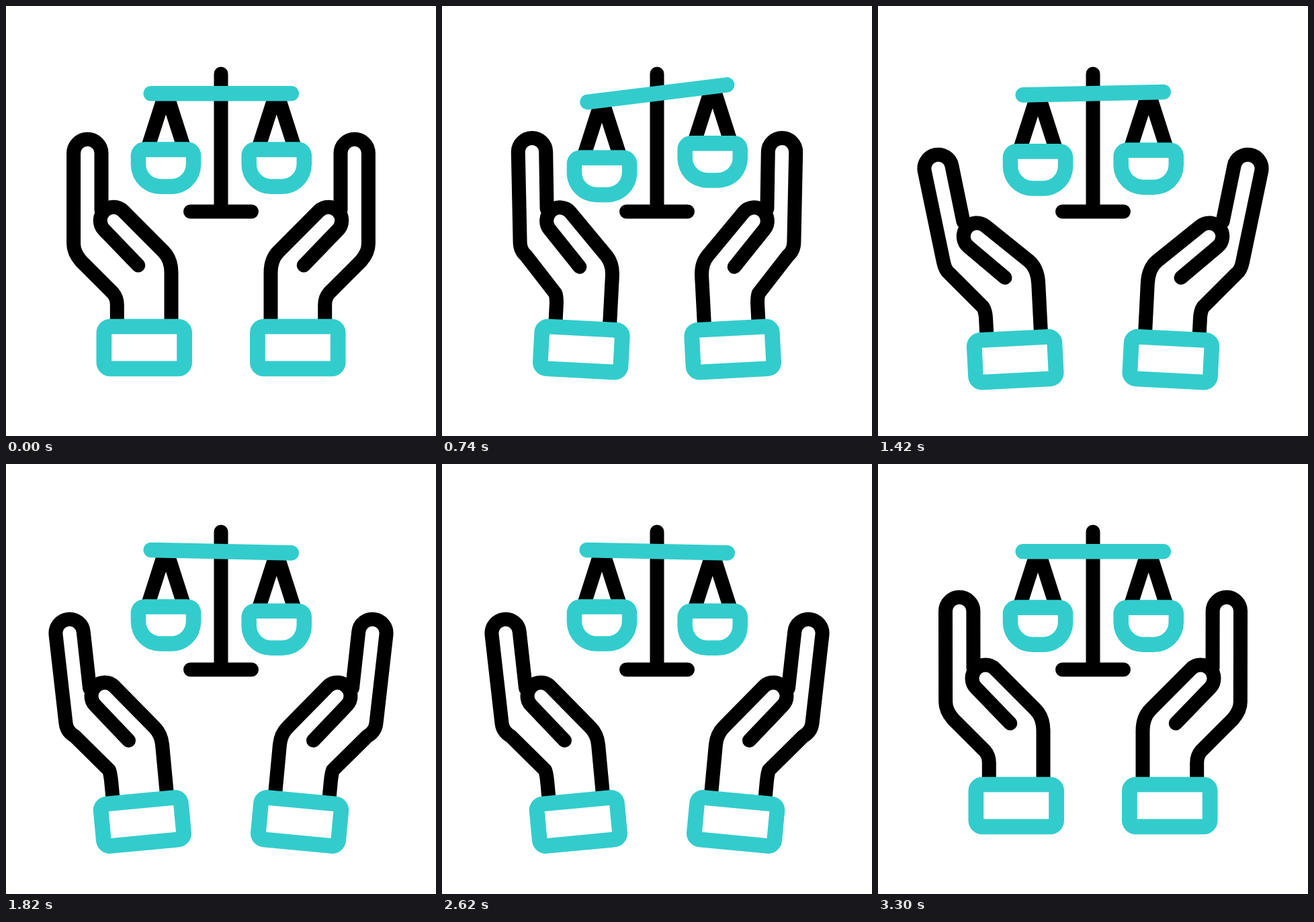
Animation, 640 px wide and 640 px high, one loop 3.4 s. Source, as an HTML page:

```html
<!DOCTYPE html>
<html lang="en">
<head>
<meta charset="utf-8">
<title>Scales between hands</title>
<style>
  html, body { margin: 0; width: 100%; height: 100%; overflow: hidden; background: #fff; }
  svg { display: block; width: 100vw; height: 100vh; }
  .ink { fill: none; stroke: #000; stroke-width: 21; }
  .round { stroke-linecap: round; stroke-linejoin: round; }
  .teal { fill: #33cccc; }
  .hole { fill: #fff; }
</style>
</head>
<body>
<svg viewBox="0 0 640 640">
  <defs>
    <g id="pan">
      <path class="ink" stroke-linejoin="bevel" d="M-27.200 212L0 127L27.200 212"/>
      <path class="teal" d="M-32 202.300H32A20.300 20.300 0 0 1 52.300 222.600V236A44 44 0 0 1 8.300 280H-8.300A44 44 0 0 1 -52.300 236V222.600A20.300 20.300 0 0 1 -32 202.300Z"/>
      <path class="hole" d="M-29.800 225H29.800V235.500A22 22 0 0 1 7.800 257.500H-7.800A22 22 0 0 1 -29.800 235.500Z"/>
    </g>
    <g id="hand">
      <path id="finger" class="ink round"/>
      <path id="thumb" class="ink round"/>
      <rect class="teal" x="134.500" y="465.700" width="142.500" height="85.500" rx="20.500"/>
      <rect class="hole" x="157.200" y="488.400" width="97" height="40"/>
    </g>
  </defs>
  <path class="ink round" d="M320 101V306M274.500 306H365.500"/>
  <use id="left" href="#pan"/>
  <use id="right" href="#pan"/>
  <rect id="beam" class="teal" x="204.500" y="118.900" width="231.500" height="22.600" rx="11.300"/>
  <use href="#hand"/>
  <use href="#hand" transform="translate(640) scale(-1 1)"/>
</svg>
<script>
const LOOP = 3400, STEP = 20, HALF = 400, SWINGS = 8, LAG = 120;
const el = id => document.getElementById(id);
const rad = Math.PI / 180;

// Rest, then swing between hi and lo with eased half periods, then rest.
function swing(t, rest, lo, hi) {
  const key = k => k <= 0 || k >= SWINGS ? rest : k % 2 ? hi : lo;
  const pos = Math.max(0, t / HALF);
  const k = Math.floor(pos), u = pos - k;
  return key(k) + (key(k + 1) - key(k)) * u * u * (3 - 2 * u);
}

const swingPoint = (t, rest, lo, hi) =>
  rest.map((v, i) => swing(t, v, lo[i], hi[i]));

const add = (p, x, y) => [p[0] + x, p[1] + y];
const fmt = p => p.map(v => v.toFixed(2)).join(' ');

function drawFinger(t) {
  const r = 20.7;
  const tip = swingPoint(t, [121.3, 219], [128.4, 218.8], [101.7, 218.6]);
  const knuckle = swingPoint(t, [100.6, 354], [106, 350], [106.6, 359]);
  const heel = swingPoint(t, [112, 380], [118.3, 371.5], [113.9, 376.5]);
  const wrist = swingPoint(t, [159, 427], [164.3, 427.3], [161.3, 428]);
  const a = swing(t, 0, -0.8, 10.4) * rad;
  const s = Math.sin(a), c = Math.cos(a);
  const inner = add(tip, r * c, -r * s), outer = add(tip, -r * c, r * s);
  el('finger').setAttribute('d',
    `M${fmt(add(inner, 85 * s, 85 * c))}L${fmt(inner)}A${r} ${r} 0 0 0 ${fmt(outer)}` +
    `L${fmt(knuckle)}Q${fmt(add(knuckle, 13 * s, 13 * c))} ${fmt(heel)}` +
    `L${fmt(wrist)}Q165.3 434 165.3 445V474`);
}

function drawThumb(t) {
  const r = 20;
  const pad = swingPoint(t, [160, 319], [169.5, 315.3], [156.1, 323.8]);
  const bend = swingPoint(t, [234.5, 365.5], [237, 371], [233, 361.5]);
  const a = swing(t, 45, 52, 39.7) * rad;
  const x = r * Math.sin(a), y = -r * Math.cos(a);
  el('thumb').setAttribute('d',
    `M196.800 386L${fmt(add(pad, -x, -y))}A${r} ${r} 0 0 1 ${fmt(add(pad, x, y))}` +
    `L${fmt(bend)}Q246 ${(bend[1] + 11.5).toFixed(2)} 246 397V474`);
}

function draw(t) {
  el('beam').setAttribute('transform', `rotate(${swing(t, 0, -8, 8)} 320 130.2)`);
  el('left').setAttribute('transform', `translate(238 ${swing(t, 0, 13.8, -12.2)})`);
  el('right').setAttribute('transform', `translate(402.7 ${swing(t, 0, -11, 17)})`);
  const drop = swing(t, 0, 0, 41.6), tilt = swing(t, 0, 4, -12.3);
  el('hand').setAttribute('transform', `translate(0 ${drop}) rotate(${tilt} 205.7 539)`);
  drawFinger(t - LAG);
  drawThumb(t - LAG);
}

const start = performance.now();
function tick(now) {
  const t = Math.max(0, now - start) % LOOP;
  draw(Math.floor(t / STEP) * STEP);
  requestAnimationFrame(tick);
}
draw(0);
requestAnimationFrame(tick);
</script>
</body>
</html>
```
